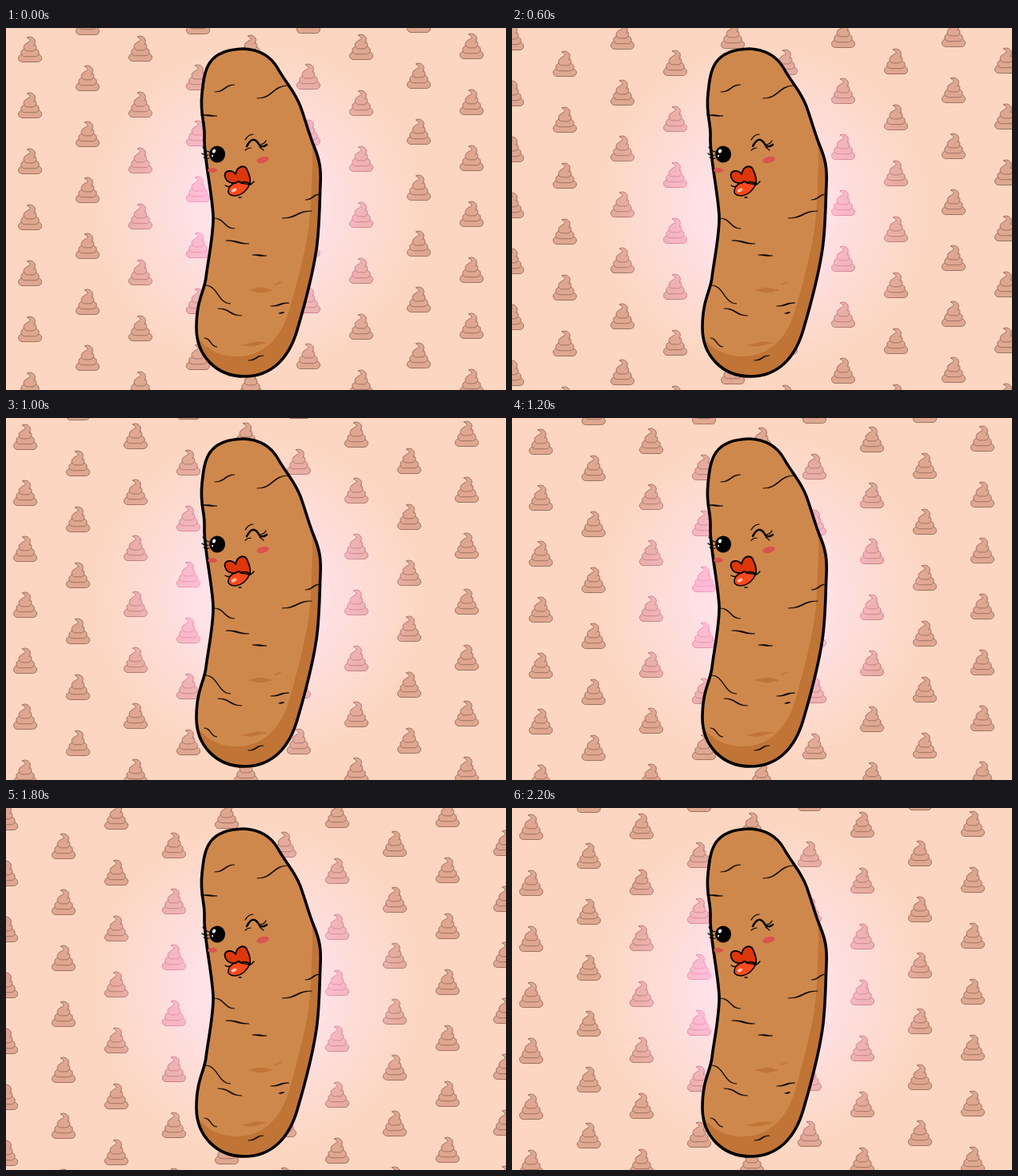
Recreate the animation shown at these times as an HTML page with a canvas. Size 625 by 453 pixels, loop 2300 ms.

```html
<!DOCTYPE html>
<html>
<head>
<meta charset="utf-8">
<style>
  html, body { margin: 0; width: 100%; height: 100%; overflow: hidden; background: #fcd6c0; }
  canvas { display: block; }
</style>
</head>
<body>
<canvas id="stage" width="625" height="453"></canvas>
<script>
const W = 625, H = 453, LOOP = 2300, STEP = 100;
const PEACH = '#fcd6c0', SKIN = '#cf884c', SHADE = '#c07436', BLUSH = '#da544f';
const ctx = document.getElementById('stage').getContext('2d');
ctx.lineCap = ctx.lineJoin = 'round';

const fill = (path, color) => { ctx.fillStyle = color; ctx.fill(path); };
const line = (path, width, color = '#000') => {
  ctx.lineWidth = width;
  ctx.strokeStyle = color;
  ctx.stroke(path);
};
const ellipse = (x, y, rx, ry, turn, color) => {
  const p = new Path2D();
  p.ellipse(x, y, rx, ry, turn, 0, 7);
  fill(p, color);
};

// S-shaped wrinkle, thin at both ends
function wrinkle(x, y, dx, dy, thick = 1, color = '#000') {
  const p = new Path2D(), mid = x + dx / 2;
  p.moveTo(x, y);
  p.bezierCurveTo(mid, y - thick, mid, y + dy - thick, x + dx, y + dy);
  p.bezierCurveTo(mid, y + dy + thick, mid, y + thick, x, y);
  fill(p, color);
  line(p, .5, color);
}

const body = new Path2D('M297 26C315 27 330 33 340 51S361 79 368 98S378 131 385 148' +
  'S394 176 393 196S392 250 388 277S374 344 364 378S333 436 298 436S238 410 238 375' +
  'S248 330 250 312S259 262 259 238S247 160 248 138S242 110 245 82S250 27 297 26Z');
const lashes = new Path2D('M254 155Q249 154 246 149M253 159Q248 160 245 157M254 163Q250 164 247 162' +
  'M299 140Q303 133 309 133M318 146Q323 145 325 141M317 149L322 153M299 153Q302 150 306 150');
const wink = new Path2D('M301 148Q309 132 317 147Q321 150 326 146');
const upperLip = new Path2D('M274 187C271 177 283 177 287 183C289 172 299 170 302 179Q306 187 305 195' +
  'Q298 191 294 194Q291 190 287 194Q277 195 274 187Z');
const lowerLip = new Path2D('M278 203C279 195 286 195 290 192Q297 196 305 195C301 204 294 209 287 210C280 210 277 207 278 203Z');
const mouthLines = new Path2D('M274 197Q278 200 282 197M303 197Q307 196 310 192M291 212H294');
const curl = new Path2D('M-6-6C-4-10 1-9 0-12Q-1-14-4-15C2-18 8-13 6-8L5-5');

const glow = ctx.createRadialGradient(314, 226, 70, 314, 226, 208);
glow.addColorStop(0, 'rgba(255,70,165,1)');
glow.addColorStop(1, 'rgba(255,70,165,0)');

// Three rounded tiers, wide to narrow, under a curled tip
function drawSwirl(x, y) {
  ctx.save();
  ctx.translate(x, y);
  const paint = path => { fill(path, '#dfa790'); line(path, 1, '#a07263'); };
  for (let k = 0; k < 3; k++) {
    const half = 14.5 - 3.3 * k, tier = new Path2D();
    tier.roundRect(-half, 6 - 6.8 * k, 2 * half, 9.5, 4.7);
    paint(tier);
  }
  paint(curl);
  ctx.restore();
}

function drawBackground(step) {
  ctx.fillStyle = PEACH;
  ctx.fillRect(0, 0, W, H);
  for (let i = -2; i < 5; i++) {
    for (let j = -2; j < 8; j++) {
      const x = 30 + 138 * i + 6 * step, y = 27 - i + 70 * j + 3 * step;
      drawSwirl(x, y);
      drawSwirl(x + 72, y + 36);
    }
  }
  ctx.globalCompositeOperation = 'screen';
  ctx.fillStyle = glow;
  ctx.fillRect(0, 0, W, H);
  ctx.globalCompositeOperation = 'source-over';
}

function drawBody() {
  // The lit side is the same outline shifted up and left
  ctx.save();
  ctx.clip(body);
  fill(body, SHADE);
  ctx.translate(-10, -25);
  fill(body, SKIN);
  ctx.restore();
  line(body, 3.6);

  wrinkle(304, 328, 29, 0, 4, SHADE);
  wrinkle(336, 321, 9, -3, 1, SHADE);
  wrinkle(294, 397, 32, -3, 3, SHADE);

  wrinkle(261, 80, 25, -9);
  wrinkle(314, 88, 39, -16);
  wrinkle(244, 109, 20, 1);
  wrinkle(393, 208, -19, 7);
  wrinkle(382, 229, -37, 9);
  wrinkle(260, 238, 26, 13);
  wrinkle(275, 266, 29, 4);
  wrinkle(308, 284, 18, 1);
  wrinkle(249, 322, 32, 23);
  wrinkle(265, 351, 30, 9);
  wrinkle(331, 348, 23, -4);
  wrinkle(341, 357, 7, -1);
  wrinkle(248, 388, 16, 11);
  wrinkle(303, 416, 19, -6);
}

function drawFace() {
  ellipse(258, 178, 6, 3, 0, BLUSH);
  ellipse(321, 165, 8, 3.8, -.25, BLUSH);

  ellipse(264, 158, 10, 10.5, 0, '#000');
  ellipse(260, 154, 2, 2.6, .5, '#fff');
  ellipse(258, 160, 1, 1.2, 0, '#fff');
  line(lashes, 1.2);
  line(wink, 2.6);

  fill(lowerLip, '#ff481c');
  line(lowerLip, 1.6);
  fill(upperLip, '#dd360a');
  line(upperLip, 1.8);
  line(mouthLines, 1.3);
  ellipse(285, 203, 3.5, 2, -.5, '#ffc4b4');
}

function frame() {
  drawBackground(Math.floor(performance.now() % LOOP / STEP));
  drawBody();
  drawFace();
  requestAnimationFrame(frame);
}
frame();
</script>
</body>
</html>
```
